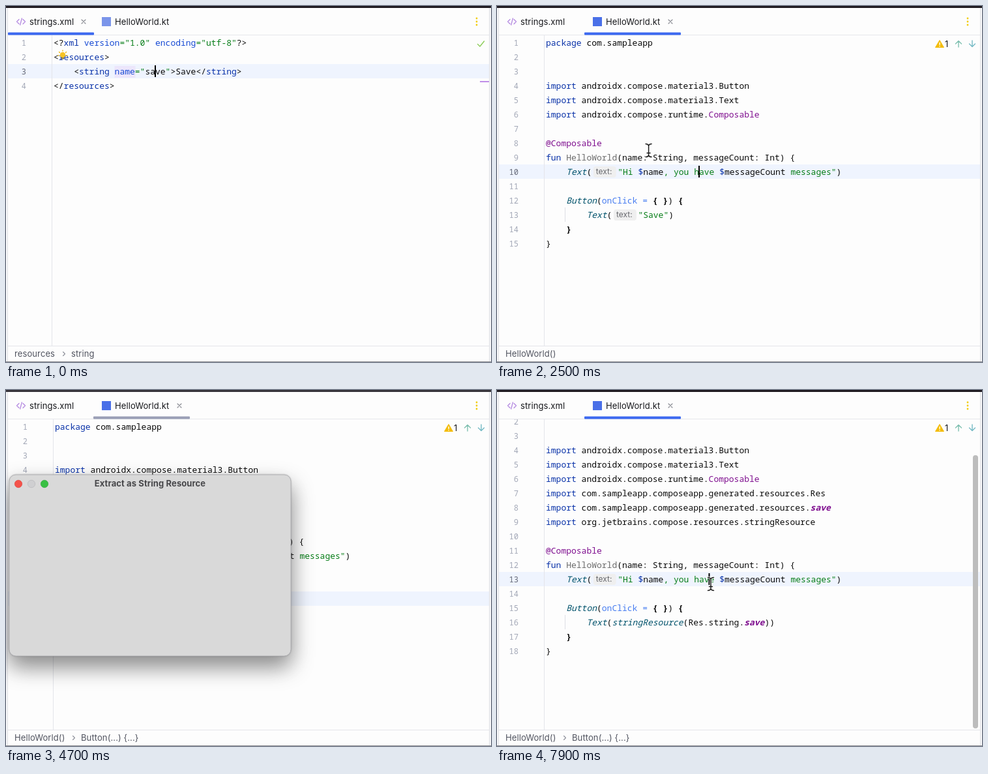
Write an HTML page that moves like this. It is 744 px wide and 546 px high and loops after 8000 ms.

```html
<!DOCTYPE html>
<html lang="en">
<head>
<meta charset="utf-8">
<title>Extract as string resource</title>
<style>
html, body { margin: 0; width: 100%; height: 100%; overflow: hidden; background: #fdfdfd; }
svg { display: block; }
text { white-space: pre; font: 13px Inter, sans-serif; letter-spacing: .1px; fill: #16171b; }
.code text { font-family: "Noto Sans Mono", "DejaVu Sans Mono", monospace; font-weight: 500; letter-spacing: 0; fill: #0a0a0a; }
.code .k { fill: #0831a8; }
.code .a { fill: #174ad4; }
.code .s { fill: #067d17; }
.code .p { fill: #7f0f8f; }
.code .q { fill: #7f0f8f; font-style: italic; font-weight: 700; }
.code .f { fill: #00526b; font-style: italic; }
.code .g { fill: #6c6c6c; }
.code .o { fill: #467cf0; }
.code .b { font-weight: 700; }
.code .num { font-size: 12px; fill: #a3a8b7; text-anchor: end; }
.code .cur { fill: #666a79; }
.code .hint { font: 12px Inter, sans-serif; fill: #66676c; }
.crumb text { fill: #50535f; }
.mid { text-anchor: middle; }
.bold { font-weight: 700; }
.line { fill: none; stroke-linecap: round; stroke-linejoin: round; }
</style>
</head>
<body>
<svg id="stage" width="744" height="546" viewBox="0 0 744 546"></svg>
<script>
const LOOP = 8000, CHAR = 7.8, ROW = 22, TOP = 45;
const BLUE = '#3c69f0';

// Event times in ms
const T = { tab: 1200, click: 3200, dialog: 4600, form: 4790, pick: 6600, done: 7100, click2: 7600 };

const rect = (x, y, w, h, fill, extra = '') =>
  `<rect x="${x}" y="${y}" width="${w}" height="${h}" fill="${fill}" ${extra}/>`;
const esc = s => s.replace(/&/g, '&amp;').replace(/</g, '&lt;');
const text = (x, y, s, cls = '') => `<text x="${x}" y="${y}" class="${cls}">${esc(s)}</text>`;
const line = (d, color, w = 1.2) => `<path class="line" d="${d}" stroke="${color}" stroke-width="${w}"/>`;
const group = (id, body, extra = '') => `<g id="${id}" ${extra}>${body}</g>`;

// «cword» marks a coloured word, the first letter being its class; «h» is an inlay hint
const xmlLines = [
  '<?«kxml» «aversion»«s="1.0"» «aencoding»«s="utf-8"»?>',
  '<«kresources»>',
  '    <«kstring» «aname»«s="»save«s"»>Save</«kstring»>',
  '</«kresources»>'
];
const imports = [
  '«kpackage» com.sampleapp', '', '',
  '«kimport» androidx.compose.material3.Button',
  '«kimport» androidx.compose.material3.Text',
  '«kimport» androidx.compose.runtime.«pComposable»'
];
const added = [
  '«kimport» com.sampleapp.composeapp.generated.resources.Res',
  '«kimport» com.sampleapp.composeapp.generated.resources.«qsave»',
  '«kimport» org.jetbrains.compose.resources.stringResource'
];
const body = label => [
  '',
  '«p@Composable»',
  '«kfun» «gHelloWorld»(name: String, messageCount: Int) {',
  '    «fText»(«h»«s"Hi »«k$»name«s, you have »«k$»messageCount«s messages"»)',
  '',
  '    «fButton»(«oonClick =» «b{ }») «b{»',
  `        «fText»(${label})`,
  '    «b}»',
  '}'
];
const before = [...imports, ...body('«h»«s"Save"»')];
const after = [...imports, ...added, ...body('«fstringResource»(Res.string.«qsave»)')];

function codeLine(src, x, y) {
  let out = '';
  for (const [, cls, word, plain] of src.matchAll(/«(\w)([^»]*)»|([^«]+)/g)) {
    if (cls === 'h') {
      out += rect(x + 2.5, y - 13, 35, 17, '#efefef', 'rx="4"') + text(x + 6.5, y - 1, 'text:', 'hint');
      x += 40;
      continue;
    }
    const s = plain ?? word;
    const lead = s.length - s.trimStart().length;
    if (s.trim()) out += text(+(x + lead * CHAR).toFixed(2), y, s.trimStart(), cls || '');
    x += s.length * CHAR;
  }
  return out;
}

function view(id, lines, current, x, scroll = 0, under = '', over = '') {
  let out = rect(3, TOP + (current - 1) * ROW, 738, ROW, '#eff4fe') + rect(x - 3, 0, 1, 600, '#e4e5ea') + under;
  lines.forEach((src, i) => {
    const y = TOP + 16 + i * ROW;
    out += text(x - 42, y, String(i + 1), i + 1 === current ? 'num cur' : 'num') + codeLine(src, x, y);
  });
  return group(id, `<g transform="translate(0 ${-scroll})">${out}${over}</g>`, 'class="code"');
}

const guide = n => rect(104, TOP + (n - 1) * ROW, 1, ROW, '#dddfe5');
const bulb = line('M87 68v1M81.500 70.500l1 1M92.500 70.500l-1 1M80 76h1M94 76h-1', '#f0b400', 1.3) +
  '<circle cx="87" cy="75" r="4.300" fill="#f7c325"/>' + rect(85, 79, 4, 2.5, '#8b7a45');
const scrollbar = rect(730, 100, 8, 419, '#bdbdbd', 'rx="4"');

const xmlIcon = line('M20 20.500l-3.500 3.500 3.500 3.500M26 20.500l3.500 3.500-3.500 3.500M24.300 19l-2.600 10', '#b48ae0', 1.3);
const close = x => line(`M${x - 3} 21l6 6m0-6l-6 6`, '#85878f', 1.1);
const chevron = x => line(`M${x - 1.5} 530.500l3 3-3 3`, '#8a8d98', 1.1);

const tabs = rect(3, 3, 738, 41, '#fdfdfd') + rect(3, 44, 738, 1, '#e6e7ec') +
  xmlIcon + text(36, 29, 'strings.xml') + text(167, 29, 'HelloWorld.kt') +
  rect(147, 17, 14, 14, '#4a70e8', 'id="ktIcon"') +
  [19, 24, 29].map(y => `<circle cx="722" cy="${y}" r="1.400" fill="#f2cd0c"/>`).join('') +
  group('tabXml', rect(3, 40.5, 132, 4, BLUE, 'rx="1"') + close(119)) +
  group('tabKt', rect(134, 40.5, 148, 4, BLUE, 'id="underline" rx="1"') + close(266));

const status = group('okMark', line('M723.500 58.500l3.500 3.500 6.500-8', '#8ccc58', 1.4) + rect(727, 115, 14, 2, '#c08ee8')) +
  group('warnMark', '<path d="M679 52.500l6.500 11h-13z" fill="#f4bd0a" stroke="#f4bd0a" stroke-linejoin="round"/>' +
    rect(678.4, 56, 1.4, 4, '#fff') + rect(678.4, 61, 1.4, 1.4, '#fff') + text(687, 62.5, '1') +
    line('M708 63v-9.500m-4.500 4.500l4.500-4.500 4.500 4.500', '#7fc0b0', 1.4) +
    line('M729 53v9.500m-4.500-4.500l4.500 4.500 4.500-4.500', '#74b9c4', 1.4));

const crumbs = rect(3, 521, 738, 24, '#fdfdfd') + rect(3, 521, 738, 1, '#e4e5ea') +
  group('crumbXml', text(13, 538, 'resources') + chevron(89) + text(100, 538, 'string')) +
  group('crumbKt', text(13, 538, 'HelloWorld()')) +
  group('crumbButton', chevron(104) + text(115, 538, 'Button(...) {...}'));

const frame = rect(0, 0, 3, 546, '#f7f7f9') + rect(2, 3, 1, 543, '#e0e1e6') +
  rect(741, 3, 1, 543, '#e0e1e6') + rect(742, 3, 2, 543, '#f7f7f9') +
  rect(0, 545, 744, 1, '#8f8f93') + rect(0, 0, 744, 3, '#1f1b21', 'id="topBar"');

const box = (x, y, w, h, fill = '#fdfdfd', stroke = '#c3c5cd') =>
  rect(x + .5, y + .5, w - 1, h - 1, fill, `rx="4" stroke="${stroke}"`);
const ring = (x, y, w, h) => rect(x, y, w, h, 'none', `rx="4" stroke="${BLUE}" stroke-width="2"`);
const light = (x, fill, stroke) => `<circle cx="${x}" cy="144" r="5.700" fill="${fill}" stroke="${stroke}" stroke-width=".6"/>`;

const form = text(17, 191, 'Resource Key') + text(17, 231, 'Resource Value') +
  box(128, 170, 294, 34) + box(128, 210, 294, 34) +
  group('keyFocus', ring(128, 170, 294, 34) + rect(137, 177, 29, 19, '#c9d5f6')) +
  text(137, 191, 'save') + rect(166, 178, 1, 17, '#000', 'id="fieldCaret"') +
  text(137, 231, 'Save') + text(17, 285, 'Match found in xml file:') +
  box(20, 317, 402, 28) + group('matchFocus', ring(20, 317, 402, 28)) +
  '<text x="221" y="336" class="mid"><tspan class="bold">save</tspan>: Save</text>' +
  box(266, 369, 72, 28) + text(302, 388, 'Cancel', 'mid') +
  rect(350, 369, 72, 28, BLUE, 'rx="4"') +
  '<text x="386" y="388" class="mid" style="fill:#fff;font-weight:500">OK</text>';

const dialog = rect(5, 130, 432, 278, '#d9d9d9', 'id="panel" rx="10" stroke="#a9a9ad" stroke-width=".8" ' +
    'style="filter:drop-shadow(0 16px 17px rgba(0,0,0,.4)) drop-shadow(0 0 1px rgba(0,0,0,.25))"') +
  light(19, '#f4524a', '#dc3d37') + light(39, '#cfcfd1', '#b4b4b7') + light(59, '#38c043', '#2ba336') +
  '<text x="221" y="148" class="mid bold" style="fill:#47474a">Extract as String Resource</text>' +
  group('form', form);

const arrow = '<path d="M0 0v17.500l4-3.700 3.200 7.200 3.300-1.400-3.200-7h5.400z" fill="#000" stroke="#fff" stroke-width="1.200"/>';
const beamPath = 'M-4.500-10q3.500 0 4.500 2.500q1-2.500 4.500-2.500M0-7.500v15M-4.500 10q3.500 0 4.500-2.500q1 2.500 4.500 2.500M-2.500 4h5';
const beam = line(beamPath, '#fff', 3) + line(beamPath, '#1c1c1c', 1.5);

const stage = document.getElementById('stage');
stage.innerHTML = '<clipPath id="area"><path d="M0 45h744v476h-744z"/></clipPath>' +
  rect(0, 0, 744, 546, '#fdfdfd') +
  group('editor',
    view('xml', xmlLines, 3, 73, 0, rect(166.500, 92, 32, 18, '#ece6fb'), bulb) +
    view('kt10', before, 10, 75, 0, guide(13)) +
    view('kt13', before, 13, 75, 0, guide(13)) +
    view('new16', after, 16, 75, 30, guide(16)) +
    view('new13', after, 13, 75, 30, guide(16)) +
    group('bar', scrollbar) + rect(-1, 0, 2, 18, '#000', 'id="caret"'), 'clip-path="url(#area)"') +
  status + tabs + group('crumbs', crumbs, 'class="crumb"') + frame +
  group('dialog', dialog) + group('arrow', arrow) + group('beam', beam);

const el = {};
stage.querySelectorAll('[id]').forEach(n => el[n.id] = n);
const show = (id, on) => el[id].style.display = on ? '' : 'none';
const move = (id, x, y) => el[id].setAttribute('transform', `translate(${x} ${y})`);

// Start time, view, caret x, caret y
const scenes = [
  [0, 'xml', 229, 91],
  [T.tab, 'kt10', 310, 245],
  [T.click, 'kt13', 247.500, 311],
  [T.done, 'new16', 425, 347],
  [T.click2, 'new13', 325.500, 281]
];

// Pointer stops: time, x, y
const path = [
  [400, 262, 150], [1050, 193, 29], [1700, 193, 29], [3000, 252, 316], [6250, 252, 316],
  [6600, 251, 338], [7150, 251, 338], [7550, 328, 297.5], [LOOP, 328, 297.5]
];

function pointer(t) {
  const i = path.findIndex(p => p[0] > t);
  if (i < 1) return path[0].slice(1);
  const [t0, x0, y0] = path[i - 1], [t1, x1, y1] = path[i];
  const u = (t - t0) / (t1 - t0), e = u * u * (3 - 2 * u);
  return [x0 + (x1 - x0) * e, y0 + (y1 - y0) * e];
}

const blink = age => Math.floor(age / 500) % 2 === 0;

function draw(t) {
  const scene = scenes.findLast(s => t >= s[0]);
  scenes.forEach(s => show(s[1], s === scene));
  const open = t >= T.dialog && t < T.done;
  const inXml = t < T.tab;

  show('caret', !open && blink(t - scene[0]));
  move('caret', scene[2], scene[3]);
  show('bar', t >= T.done);

  ['tabXml', 'okMark', 'crumbXml'].forEach(id => show(id, inXml));
  ['tabKt', 'warnMark', 'crumbKt'].forEach(id => show(id, !inXml));
  show('crumbButton', t >= T.click);
  el.ktIcon.setAttribute('fill', inXml ? '#7b95ea' : '#4a70e8');
  el.underline.setAttribute('fill', open ? '#9a9fb6' : BLUE);
  el.topBar.setAttribute('fill', open ? '#37343a' : '#1f1b21');

  show('dialog', open);
  show('form', t >= T.form);
  el.panel.setAttribute('fill', t < T.form ? '#d9d9d9' : '#f2f3f7');
  show('keyFocus', t < T.pick);
  show('fieldCaret', t < T.pick && blink(t - T.form));
  show('matchFocus', t >= T.pick);

  const [x, y] = pointer(t);
  const seen = (t >= 400 && t < 3700) || t >= 6250;
  const isArrow = open || y < 45;
  show('arrow', seen && isArrow);
  show('beam', seen && !isArrow);
  move('arrow', x, y);
  move('beam', x, y);
}

const start = performance.now();
function tick() {
  draw((performance.now() - start) % LOOP);
  requestAnimationFrame(tick);
}
tick();
</script>
</body>
</html>
```
